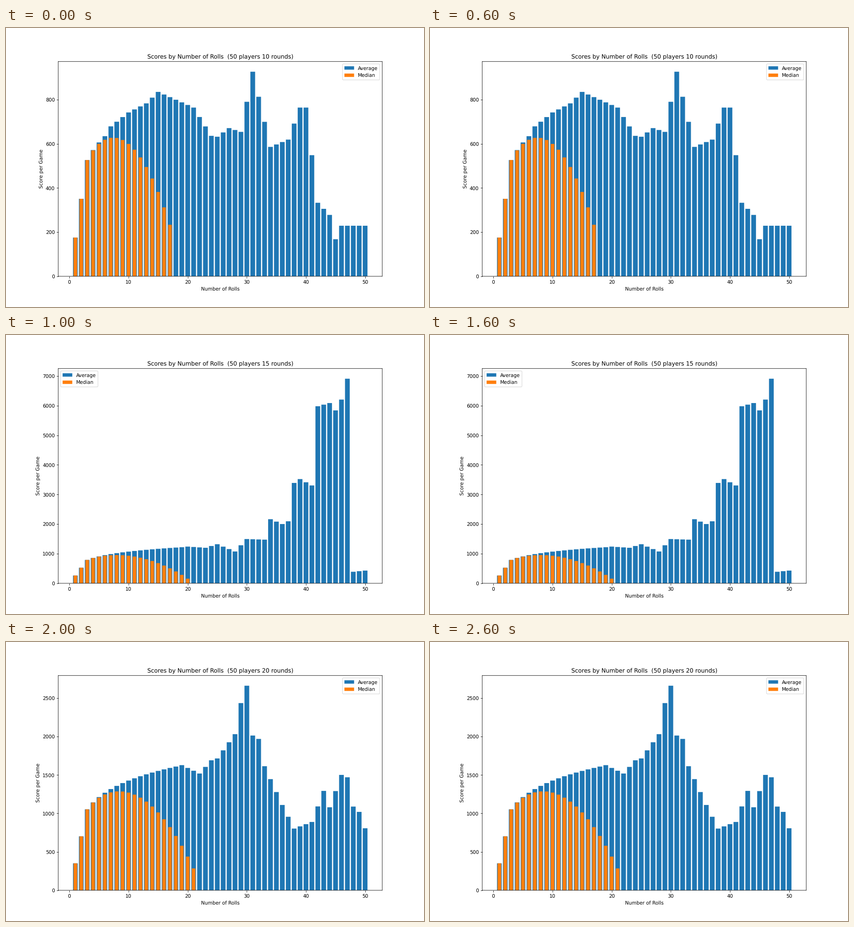
Write a matplotlib script that moves like this. It is 917 by 611 pixels and loops after 3 s.

```python
import matplotlib.pyplot as plt
import numpy as np
from matplotlib.animation import FuncAnimation

WIDTH, HEIGHT, DPI = 917, 611, 76.4
EPS = 1e-4  # keeps the pixel size from rounding down

plt.rcParams.update({
    "font.family": "DejaVu Sans",
    "path.snap": False,
    "text.hinting": "none",
})

# rounds, legend place, last median bar, median falloff,
# then the turning points (rolls, score) where luck takes over
CHARTS = [
    (10, "upper right", 17, 0.130, [
        (7, 679), (10, 742), (13, 783), (15, 835), (21, 764), (24, 636),
        (25, 632), (27, 671), (29, 654), (31, 926.4), (34, 586), (37, 619),
        (39, 764), (40, 764), (42, 333), (44, 278), (45, 168), (46, 229)]),
    (15, "upper left", 20, 0.106, [
        (20, 1240), (23, 1200), (25, 1320), (28, 1075), (30, 1495),
        (33, 1475), (34, 2165), (36, 2002), (37, 2095), (38, 3390),
        (39, 3520), (41, 3305), (42, 5980), (44, 6088), (45, 5840),
        (46, 6205), (47, 6910), (48, 390), (50, 430)]),
    (20, "upper right", 21, 0.089, [
        (19, 1628), (22, 1519), (24, 1691), (25, 1715), (28, 2031),
        (29, 2435), (30, 2661), (31, 2013), (32, 1969), (33, 1614),
        (36, 1110), (38, 803), (41, 889), (43, 1293), (44, 1080),
        (46, 1501), (47, 1470), (48, 1089), (49, 1020), (50, 807)]),
]

rolls = np.arange(1, 51)
# Expected score per round: linear for three rolls, then logarithmic
expected = np.where(rolls <= 3, 17.55 * rolls,
                    52.7 + 15.5 * np.log(rolls / 3))

fig, ax = plt.subplots(
    figsize=((WIDTH + EPS) / DPI, (HEIGHT + EPS) / DPI), dpi=DPI)
fig.subplots_adjust(left=0.125, right=0.9, bottom=0.11, top=0.88)


def average_scores(rounds, turns):
    xs, ys = zip(*turns)
    return np.where(rolls < xs[0], rounds * expected,
                    np.interp(rolls, xs, ys))


def median_scores(rounds, last, falloff):
    loss = falloff * np.maximum(rolls - 3, 0) ** 2.3
    return (rounds * (expected - loss))[:last]


def draw_bars(values, width, label, color):
    ax.bar(rolls[:len(values)], values, width, label=label, color=color)


def draw(index):
    rounds, legend_loc, last, falloff, turns = CHARTS[index]
    ax.clear()
    draw_bars(average_scores(rounds, turns), 0.8, "Average", "tab:blue")
    draw_bars(median_scores(rounds, last, falloff), 0.6,
              "Median", "tab:orange")
    ax.set_title(f"Scores by Number of Rolls  (50 players {rounds} rounds)")
    ax.set_xlabel("Number of Rolls")
    ax.set_ylabel("Score per Game")
    ax.legend(loc=legend_loc)


anim = FuncAnimation(fig, draw, frames=len(CHARTS), interval=1000,
                     init_func=lambda: draw(0), repeat=True)
plt.show()
```
